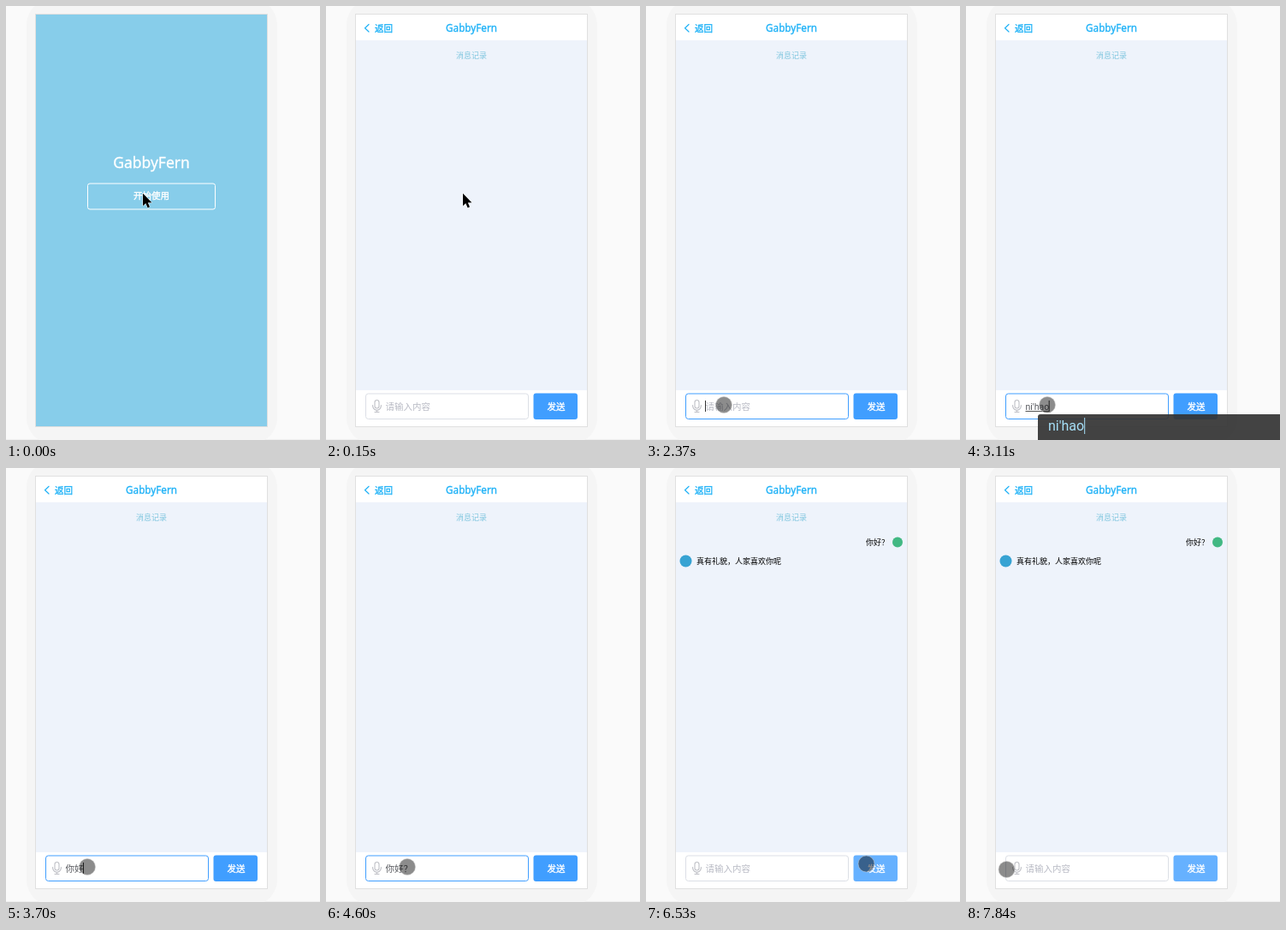
An HTML page that plays this animation: 367x506 px, repeating every 7.99 s.

```html
<!DOCTYPE html>
<html lang="zh-CN">
<head>
<meta charset="utf-8">
<style>
html, body { margin: 0; height: 100%; overflow: hidden; background: #fafafa; }
svg { display: block; width: 367px; height: 506px; font: 10.5px "Noto Sans", "Noto Sans CJK SC", "Noto Sans CJK", sans-serif; }
.mid { text-anchor: middle; }
.med { fill: currentColor; stroke: currentColor; stroke-width: .35; }
.latin { font-family: Roboto, "Noto Sans CJK SC", "Noto Sans CJK", sans-serif; }
.line { fill: none; stroke-linecap: round; }
</style>
</head>
<body>
<svg viewBox="0 0 367 506">
  <path d="M0 505.5H367" stroke="#f0f0f0"/>
  <rect x="24" y="-8" width="293" height="518" rx="30" fill="#f5f5f5"/>
  <rect x="34.5" y="9.5" width="271" height="481" fill="#fff" stroke="#e0e0e0"/>

  <g id="splash" color="#fff">
    <rect x="35" y="10" width="270" height="480" fill="#87cdea"/>
    <text class="mid med" x="170" y="189" font-size="17.5">GabbyFern</text>
    <rect x="95.5" y="207" width="149" height="30" rx="2.5" fill="none" stroke="#fff"/>
    <text class="mid med" x="170" y="225">开始使用</text>
  </g>

  <g id="chat">
    <rect x="35" y="40" width="270" height="408" fill="#eef3fb"/>
    <g color="#1fb2f7">
      <path class="line" d="M50 21.5L45.5 25.7L50 30" stroke="currentColor" stroke-width="1.2"/>
      <text class="med" x="57" y="29.5">返回</text>
      <text class="mid med" x="170" y="30" font-size="11.7">GabbyFern</text>
    </g>
    <text class="mid" x="170" y="61.3" font-size="9" fill="#7fc6df">消息记录</text>

    <g id="messages" font-size="9">
      <text x="257" y="90.3">你好？</text>
      <circle cx="294" cy="86.5" r="6" fill="#42b883"/>
      <text x="59" y="112.3">真有礼貌，人家喜欢你呢</text>
      <circle cx="46.5" cy="108.5" r="7" fill="#37a3d3"/>
    </g>

    <rect id="field" x="46.5" y="452" width="190" height="29.5" rx="3" fill="#fff"/>
    <g class="line" stroke="#bfc0c6" stroke-width="1.1">
      <rect x="57" y="459.5" width="5" height="9.5" rx="2.5"/>
      <path d="M54.5 465.5a5 5.7 0 0 0 10 0M59.5 471.3V473.5M57 473.5H62"/>
    </g>
    <text id="typed" class="latin" x="69.5" y="471"></text>
    <path id="under" stroke="#555"/>
    <path id="caret" stroke="#333"/>
    <rect id="send" x="242.5" y="451.5" width="51.5" height="30.5" rx="3"/>
    <text class="mid med" x="269" y="471" color="#fff">发送</text>
  </g>

  <path id="arrow" d="M160 218.5V233L163.3 230L165.6 235.2L168 234.2L165.8 229.2H170.4Z" stroke="#fff" paint-order="stroke"/>
  <circle id="touch" r="9.5" fill="#000" fill-opacity=".45" stroke="#ccc" stroke-opacity=".5"/>

  <g id="ime">
    <rect id="panel" x="84" y="476" height="34" rx="3" fill="#333" fill-opacity=".92"/>
    <text id="pinyin" class="latin" x="96" y="495" font-size="16" fill="#a6e0f8"></text>
    <path id="imeCaret" stroke="#a6e0f8"/>
  </g>
</svg>
<script>
// The screen refreshes in 54 equal ticks; every event below is given in ticks.
const LOOP = 7990, TICK = LOOP / 54;
const FOCUS = 9, COMPOSE = 18, COMMIT = 24, CLICK = 38, REPLY = 44;

const el = id => document.getElementById(id);
const set = (id, attrs) => { for (const k in attrs) el(id).setAttribute(k, attrs[k]); };
const show = (id, on) => set(id, { display: on ? "inline" : "none" });
const smooth = p => p * p * (3 - 2 * p);

const typing = [
  { at: 8, text: "" },
  { at: COMPOSE, text: "n" },
  { at: 20, text: "ni'h" },
  { at: 21, text: "ni'hao" },
  { at: COMMIT, text: "你好" },
  { at: 27, text: "你好？" },
  { at: CLICK + 1, text: "" }
];

// Eased strokes from the previous end point, bowed sideways by `bow`.
const strokes = [
  { from: 3, until: 7, to: [91, 465], bow: [0, 95] },
  { from: 19, until: 20, to: [95, 465], bow: [0, 0] },
  { from: 33, until: CLICK, to: [257.5, 461.5], bow: [0, -5] },
  { from: 45, until: 53, to: [47.5, 468], bow: [-80, 15] }
];

function touchAt(n) {
  let pos = [160, 171];
  for (const { from, until, to, bow } of strokes) {
    const p = Math.min(1, Math.max(0, (n - from) / (until - from)));
    pos = pos.map((v, i) => v + (to[i] - v) * smooth(p) + bow[i] * Math.sin(Math.PI * p));
  }
  return pos;
}

function drawInput(n) {
  const { at, text } = typing.filter(s => s.at <= n).pop() || typing[0];
  const composing = n >= COMPOSE && n < COMMIT;
  const focused = n >= FOCUS && n < CLICK;

  el("typed").textContent = text || "请输入内容";
  set("typed", { fill: text ? "#55575c" : "#b8bac4" });
  const x = 69.5 + (text && el("typed").getComputedTextLength());
  show("caret", focused && (n - at) % 8 < 4);
  set("caret", { d: `M${x} 460V473` });
  show("under", composing);
  set("under", { d: `M69.5 472.5H${x}` });
  set("field", { stroke: focused ? "#409eff" : "#dcdfe6" });
  set("send", { fill: n >= CLICK ? "#66b1ff" : "#409eff" });

  show("ime", n >= COMPOSE && n <= COMMIT);
  set("ime", { opacity: composing ? 1 : .4 });
  if (composing) {
    el("pinyin").textContent = text;
    set("panel", { width: 232 + 17 * text.length });
    set("imeCaret", { d: `M${96.5 + el("pinyin").getComputedTextLength()} 480V499` });
  }
}

function draw(t) {
  const n = Math.floor((t + 8) / TICK) % 54;
  show("splash", n < 1);
  show("chat", n >= 1);
  show("messages", n >= REPLY);
  show("arrow", n < 3);
  show("touch", n >= 3);
  const [cx, cy] = touchAt(n);
  set("touch", { cx, cy });
  drawInput(n);
}

const start = performance.now();
function tick() {
  draw((performance.now() - start) % LOOP);
  requestAnimationFrame(tick);
}
tick();
</script>
</body>
</html>
```
